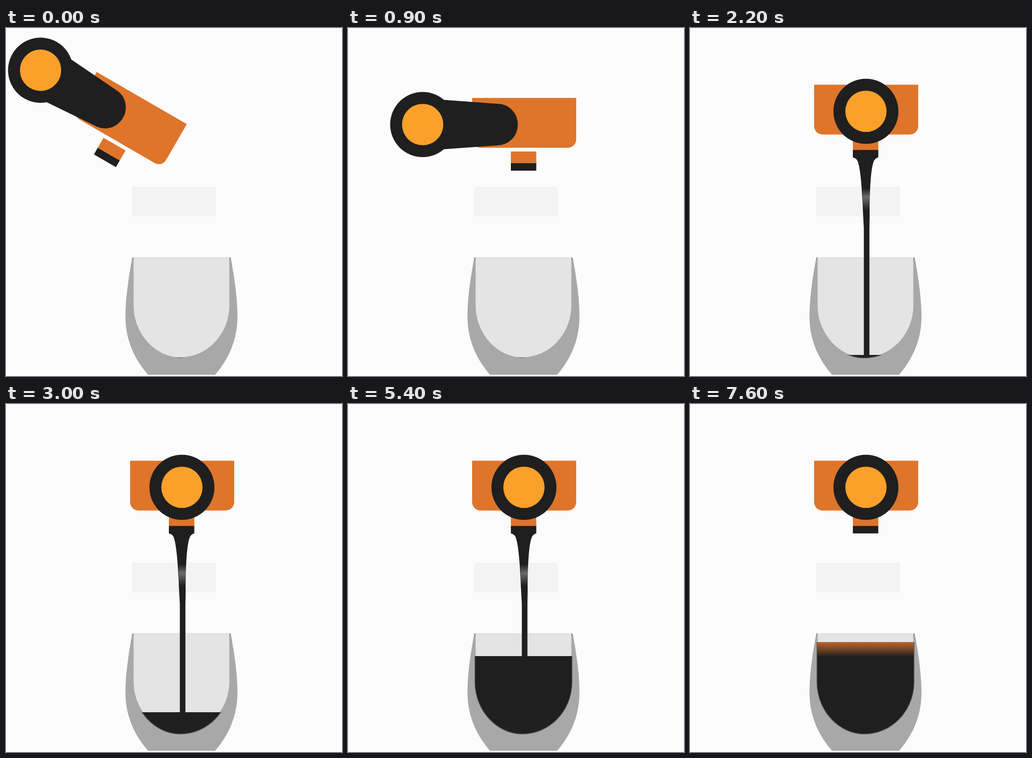
An HTML page for the animation above (8 s loop, 720 by 744 pixels).

```html
<!DOCTYPE html>
<html lang="en">
<head>
<meta charset="utf-8">
<title>Coffee pour</title>
<style>
  html, body { margin: 0; width: 100%; height: 100%; overflow: hidden; background: #fcfcfc; }
  svg { display: block; width: 100%; height: 100%; }
  .dark { fill: #1f1f1f; }
  .copper { fill: #de752b; }
</style>
</head>
<body>
<svg viewBox="0 0 720 744">
  <defs>
    <clipPath id="bowl">
      <path id="bowlShape" d="M272 491V596C273 657 320 705.5 373 705.5C432 705.5 479 657 480 596V491Z"/>
    </clipPath>
    <clipPath id="pour"><rect id="pourClip" x="340" width="72"/></clipPath>
    <linearGradient id="foam" x2="0" y2="1">
      <stop offset="0" stop-color="#b8642b"/>
      <stop offset=".3" stop-color="#91512a"/>
      <stop offset="1" stop-color="#1f1f1f"/>
    </linearGradient>
    <linearGradient id="haze" x2="0" y2="1">
      <stop offset="0" stop-color="#f3f3f3" stop-opacity="0"/>
      <stop offset=".4" stop-color="#f3f3f3" stop-opacity=".36"/>
      <stop offset="1" stop-color="#f3f3f3" stop-opacity="0"/>
    </linearGradient>
  </defs>

  <rect x="270" y="339" width="180" height="64" fill="#f3f3f3"/>

  <!-- glass -->
  <path fill="#a8a8a8" d="M270.5 490.5C262 537 256 580 256 617C256 668 276 709 304.5 741.5H448C476 709 496 668 496 617C496 580 490 537 481.5 490.5Z"/>
  <path d="M366 704.5H379" stroke="#7c7c7c" stroke-width="2"/>
  <path fill="#e4e4e4" d="M273.5 490.5V594C274 655 321 704 373 704C431 704 478 655 478.5 594V490.5Z"/>
  <path d="M272 491V496M480 491V496" stroke="#858585" stroke-width="1.5"/>

  <!-- coffee -->
  <g clip-path="url(#bowl)">
    <g id="coffee">
      <rect class="dark" x="268" width="216" height="240"/>
      <rect id="crema" x="268" width="216" height="32" fill="url(#foam)"/>
    </g>
  </g>
  <clipPath id="wet"><rect id="wetClip" x="268" width="216" height="240"/></clipPath>
  <use href="#bowlShape" fill="none" stroke="#555" stroke-width="1.5" clip-path="url(#wet)"/>

  <g clip-path="url(#pour)">
    <path class="dark" d="M350 275V277C354 278 357 280 359 284C366 302 369 350 371 400L372.5 428V712H384.5V428L385 400C385 350 387 305 393 287C395 281 398 279 402 277V275Z"/>
    <rect x="370" y="343" width="16" height="46" fill="url(#haze)"/>
  </g>

  <!-- portafilter -->
  <g id="filter">
    <rect class="copper" x="349" y="264" width="54.5" height="26"/>
    <rect class="dark" x="349" y="289" width="54.5" height="16"/>
    <path class="copper" d="M266 149.5H489V238A18 18 0 0 1 471 256H284A18 18 0 0 1 266 238Z"/>
    <path class="dark" id="handle"/>
    <g id="knob">
      <circle class="dark" r="69.7"/>
      <circle r="44.2" fill="#fba02b"/>
    </g>
  </g>
</svg>
<script>
  const LOOP = 8000, STEP = 100;
  const el = id => document.getElementById(id);
  const span = (t, a, b) => Math.min(1, Math.max(0, (t - a) / (b - a)));
  const mix = (a, b, p) => a + (b - a) * p;
  const outQuad = p => 1 - (1 - p) ** 2;
  const outBack = p => 1 + 2.70158 * (p - 1) ** 3 + 1.70158 * (p - 1) ** 2;

  function moveFilter(t) {
    const drop = 1 - outBack(span(t, 0, 900));
    const lift = -28.3 * outQuad(span(t, 900, 1400));
    const turn = outQuad(span(t, 900, 2000));
    const x = mix(160, 377, turn), y = 206.4;
    const end = x + mix(160, 0, turn);
    el('filter').setAttribute('transform',
      `translate(${-113.3 * drop} ${-7.2 * drop + lift}) rotate(${30 * drop} 377 203)`);
    el('knob').setAttribute('transform', `translate(${x} ${y})`);
    el('handle').setAttribute('d',
      `M${x} ${y - 56}L${end} ${y - 44.5}A44 44.5 0 0 1 ${end} ${y + 44.5}L${x} ${y + 56}Z`);
  }

  function movePour(t) {
    const level = mix(709, 509, span(t, 2000, 6000));
    const top = mix(276, 510, span(t, 6300, 7600) ** 2);
    const tip = mix(276, 712, span(t, 1900, 2200) ** 2);
    const bottom = Math.min(tip, Math.min(level, 704) + 1);
    el('coffee').setAttribute('transform', `translate(0 ${level})`);
    el('wetClip').setAttribute('y', level);
    el('crema').setAttribute('opacity', span(t, 5400, 7600));
    el('pourClip').setAttribute('y', top);
    el('pourClip').setAttribute('height', t >= 7600 ? 0 : Math.max(0, bottom - top));
  }

  function draw(now) {
    const t = Math.floor((now % LOOP) / STEP) * STEP;
    moveFilter(t);
    movePour(t);
  }

  const start = performance.now();
  function tick() {
    draw(performance.now() - start);
    requestAnimationFrame(tick);
  }
  tick();
</script>
</body>
</html>
```
